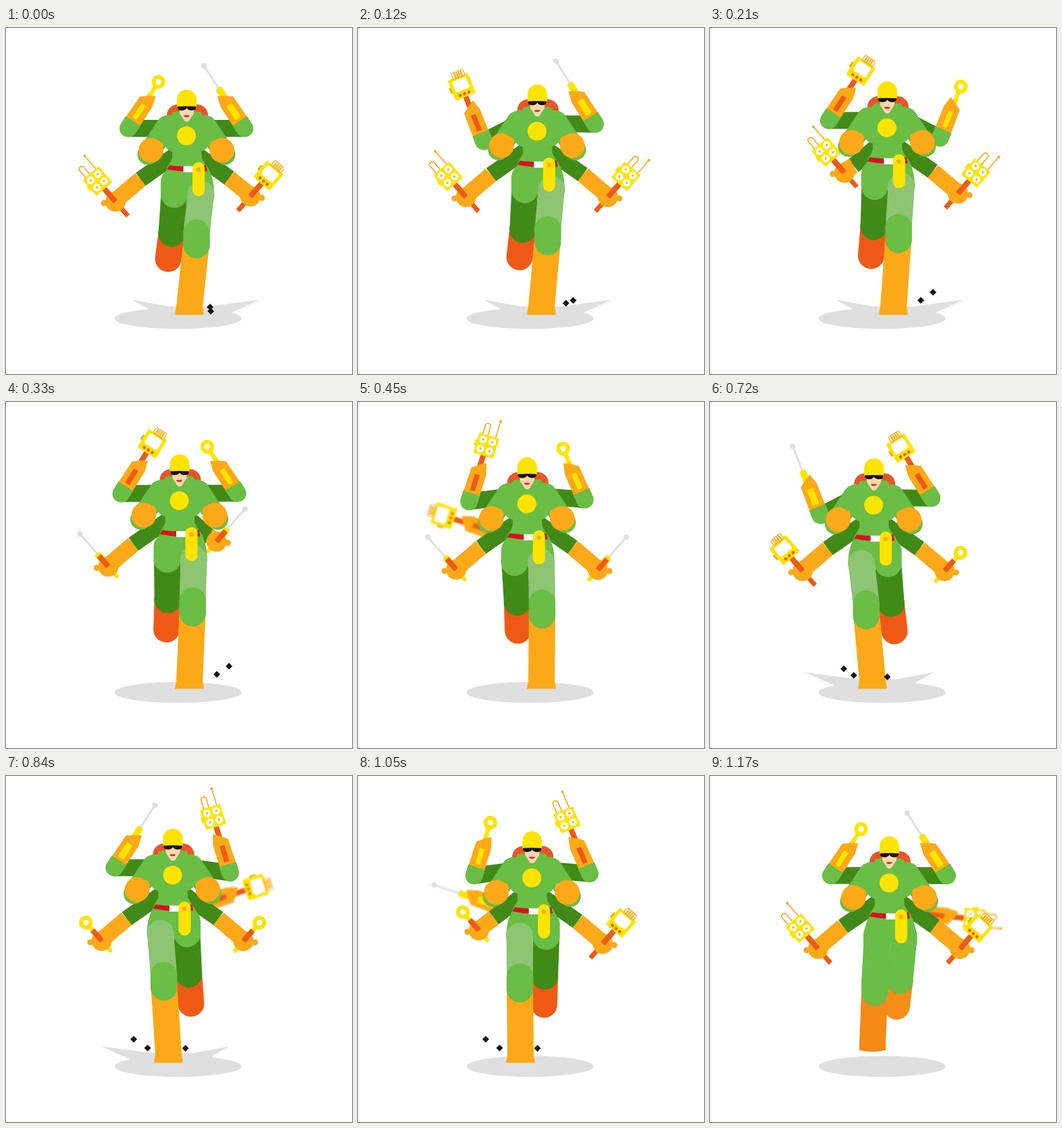
An HTML page for the animation above (1200 ms loop, 512 by 512 pixels).

```html
<!DOCTYPE html>
<html lang="en">
<head>
<meta charset="utf-8">
<title>Many-armed runner</title>
<style>
html, body { margin: 0; width: 100%; height: 100%; overflow: hidden; background: #fff; }
svg { display: block; width: 100vw; height: 100vh; }
</style>
</head>
<body>
<svg id="stage" viewBox="0 0 512 512"></svg>
<script>
const LOOP = 1200, HALF = 600, STEP = 30, SWAP = 300;
const C = {
  green: '#6abd45', dark: '#418a17', light: '#8dc572', orange: '#fba919',
  red: '#ee5a16', yellow: '#fde400', grey: '#dfdfdf', skin: '#fbd9ac'
};
const stage = document.getElementById('stage');

const mod = (a, n) => ((a % n) + n) % n;
const clamp = v => Math.max(0, Math.min(1, v));
const bell = (d, w) => Math.exp(-d * d / (w * w));
const lerp = (a, b, q) => a + (b - a) * q;
function mix(a, b, q) {
  const ch = (c, i) => parseInt(c.slice(i, i + 2), 16);
  return 'rgb(' + [1, 3, 5].map(i => Math.round(lerp(ch(a, i), ch(b, i), clamp(q)))) + ')';
}

// Shape helpers
const circle = (x, y, r, f) => `<circle cx="${x}" cy="${y}" r="${r}" fill="${f}"/>`;
const rect = (x, y, w, h, f, r = 0) =>
  `<rect x="${x}" y="${y}" width="${w}" height="${h}" rx="${r}" fill="${f}"/>`;
const path = (d, f) => `<path d="${d}" fill="${f}"/>`;
const wire = (d, w, c) => `<path d="${d}" fill="none" stroke="${c}" stroke-width="${w}"/>`;
const line = (x1, y1, x2, y2, w, c, cap = 'butt') =>
  `<line x1="${x1}" y1="${y1}" x2="${x2}" y2="${y2}" stroke="${c}" stroke-width="${w}" stroke-linecap="${cap}"/>`;
const shift = (x, y, s) => `<g transform="translate(${x} ${y})">${s}</g>`;
const place = (x, y, a, s) => `<g transform="translate(${x} ${y}) rotate(${a})">${s}</g>`;

// Tools point up from a hand at the origin.
const tools = {
  wrench: () => path('M-4-5L-3-20Q-2-25-6-30H6Q2-25 3-20L4-5Z', C.yellow) +
    `<circle cy="-36" r="7.2" fill="none" stroke="${C.yellow}" stroke-width="6"/>`,
  probe: () => line(0, -22, 0, -63, 3, C.grey) + circle(0, -64, 4, C.grey) +
    rect(-5, -26, 10, 22, C.yellow, 4),
  meter: () => {
    let s = rect(-4, -28, 8, 22, C.red) + rect(-18.5, -46, 4, 9, '#f5a800', 1) +
      rect(-16, -57, 32, 32, C.yellow, 1.5) + rect(-11, -53, 22, 17, '#fff', 2);
    for (let i = -1; i < 2; i++) s += circle(i * 7, -30, 2.3, C.red);
    for (let i = 0; i < 5; i++) {
      const x = i * 3.4 - 5;
      s += wire(`M${x - 2.5}-60a2.5 5 0 1 1 5 0a2.5 5 0 1 1-5 0`, 1.2, C.orange);
    }
    return s;
  },
  lamps: () => {
    let s = wire('M-10-55V-69Q-10-73-6-73T-2-69V-55M10-55V-80', 1.6, C.orange) +
      circle(10, -81, 2, C.orange) + rect(-4, -28, 8, 22, C.red) +
      rect(-15.5, -56, 31, 31, C.yellow, 1.5) + rect(-18, -45, 4, 9, C.yellow, 1);
    for (const x of [-7, 7]) for (const y of [-48, -34])
      s += circle(x, y, 5.6, '#fff') + circle(x, y, 1.7, '#f4b400');
    return s;
  }
};
const boxy = n => n === 'meter' || n === 'lamps';

// Forearm pointing up from an elbow at the origin.
function forearm(tool, side) {
  const w = tool === 'probe' ? 10 : 7.5, b = boxy(tool);
  return shift(0, -46, tools[tool]()) +
    `<g transform="scale(${-side} 1)">${path('M-12.5-8L-11.500-49L-1-57L8-62L10-55L12.500-46V-8Z', C.orange)}</g>` +
    rect(-w / 2, -42, w, 25, b ? C.red : C.yellow, b ? 0 : 2) +
    path('M-13-13H13V0A13 13 0 0 1-13 0Z', C.green);
}

// Each raised arm swings out at a swap; an extra arm takes the old tool down.
function upperArm(t, side, first, list) {
  const n = mod(t - first, LOOP), d = n % SWAP, i = Math.floor(n / SWAP);
  const swing = bell(d, 27) + bell(SWAP - d, 46);
  const drop = 26 * swing, sx = 267 + side * 36;
  const ex = sx + side * Math.sqrt(2500 - drop * drop), ey = 148.5 + drop;
  let s = line(sx - side * 8, 148.5, ex, ey, 25, C.dark) +
    place(ex, ey, side * (55 * swing - 33), forearm(list[i], side));
  if (d > 15 && d < 75) {
    const old = forearm(list[(i + 3) % 4], side);
    s += `<g filter="url(#soft)">${place(267 + side * 40, 204, side * (48 + 0.8 * d), old)}</g>`;
  }
  return s;
}

// Lowered arms pull up and inwards for a moment at each swap.
function lowerArm(t, side, first, gap, list) {
  const i = Math.min(3, Math.floor(mod(t - first, LOOP) / gap));
  const tool = list[i];
  let w = 0;
  for (let k = 0; k < 4; k++) w += bell(t - first - k * gap, 24);
  const at = x => 267 + side * x;
  const hx = at(105 - 50 * w), hy = 257 - 37 * w;
  const ex = at(68 - 22 * w), ey = 224 - 10 * w;
  const tail = boxy(tool) ? rect(-3.5, 0, 7, 28, C.red) : rect(-3, 0, 6, 22, C.yellow, 3);
  return line(at(15), 187, ex, ey, 24, C.dark) +
    place(hx, hy, side * 41, tools[tool]() + tail) +
    line(ex, ey, hx - side * 4, hy - 5, 24, C.orange) +
    circle(hx, hy, 15, C.orange) + circle(hx + side * 17, hy + 2, 4.5, C.orange) +
    place(hx, hy, side * 41, rect(-4, -21, 8, 21, C.red, 1));
}

function legs(u, p, right, X, dy) {
  const m = x => right ? x : 512 - x;
  const hipY = 246 + dy, lift = clamp(u * 10 - 9);
  const hip = out => X + (out === right ? 21.5 : -18);

  const thigh = (hx, kx, ky, len, far) => {
    const upper = far < .5 ? mix(C.light, C.green, far * 2) : mix(C.green, C.dark, far * 2 - 1);
    return line(hx, hipY, kx, ky, 39, upper, 'round') +
      line(kx, ky, kx, ky + len, 39.5, mix(C.green, C.dark, far * 2 - 1), 'round') +
      line(hx, hipY - 18 * far, hx, hipY, 40, mix(C.light, C.green, far * 2), 'round');
  };

  const bx = m(245 - 15 * p), by = 304 + dy * .85;
  const back = line(bx, by, m(240 - 4.5 * u), 341.500 + dy * .38, 39, mix(C.red, C.orange, lift * 1.3), 'round') +
    thigh(hip(false), bx, by, 0, 1 - lift);

  const fx = m(282 - 15 * p), fy = 303 + dy * .65;
  const ax = m(271.5), base = 424.5 - 38 * lift, flare = lift ? 0 : 2;
  const front = path(`M${fx - 19.5} ${fy + 12}H${fx + 19.5}L${ax + 19.5} ${base - 12}L${ax + 19.5 + flare} ${base}` +
      `Q${ax} ${base + 10 * lift} ${ax - 19.5 - flare} ${base}L${ax - 19.5} ${base - 12}Z`,
      mix(C.orange, C.red, lift * .8)) +
    thigh(hip(true), fx, fy, 18, lift);

  const pelvis = path('M240 205Q230 220 229 244H308Q308 222 298 205Z', C.green);
  return back + shift(X - 267, dy, pelvis) + front;
}

function ground(u, right) {
  let s = `<ellipse cx="254.5" cy="429.7" rx="94" ry="15.5" fill="${C.grey}"/>`;
  if (u < .55) {
    const spikes = path('M186 402L240 412H301L376 402L334 421L345 428H200L213 417Z', C.grey);
    s += right ? spikes : `<g transform="translate(517 -2) scale(-1 1)">${spikes}</g>`;
  }
  return s;
}

function debris(u, right) {
  if (u > (right ? .55 : .8)) return '';
  const p = clamp(u / .35);
  const bit = (x, y, dx, dy) =>
    path(`M${x + dx * p} ${y + dy * p}m0-5l5 5l-5 5l-5-5z`, '#1a1416');
  return right
    ? bit(302, 413, 10, -10) + bit(303, 419, 27, -28)
    : bit(210, 402, -21, -12.5) + bit(217, 407, -7.5, -4.5) + (u > .1 ? bit(258, 412, 7.5, -9) : '');
}

function torso() {
  let s = path('M246 182H289L290 193L298 207H238L246 193Z', C.green) +
    path('M247 124Q267 121 288 124L300 150L296 176Q288 185 278 184H256Q246 185 238 176L234 150Z', C.green);
  for (const k of [-1, 1]) {
    const x = v => 267 + k * v;
    s += circle(x(26), 143, 14.5, C.green) + circle(x(15), 163, 21, C.green) +
      line(x(29), 145, x(57), 187, 31, C.green, 'round') +
      circle(x(52.5), 181, 18.3, C.orange) +
      line(x(52), 177, x(41), 174, 14, C.orange, 'round');
  }
  return s + circle(267, 159.5, 14, C.yellow);
}

function belt() {
  return path('M242 203Q270 207 296 203L298 212Q268 215 238 209Z', '#d8121f') +
    rect(262.5, 204.5, 15, 9, '#fff') +
    rect(276, 198.5, 18, 50.5, C.yellow, 9) + circle(284.7, 209.5, 3.2, C.orange);
}

const hair = () => rect(238, 114, 61, 40, '#ea5426', 16);

function head() {
  return path('M256 114H279L278 127L271 138Q267 141 264 138L257 127Z', C.skin) +
    path('M253 118V106.500A14.500 14.500 0 0 1 282 106.500V118Q267 115 253 118Z', C.yellow) +
    path('M253.500 117Q267 116 281.500 117Q281 123 275 122.700Q269 122.500 267.500 119Q266 122.500 260 122.700Q254 123 253.500 117Z', '#17110f') +
    path('M262.500 131Q265 129 267.200 130Q269.500 129 272 131Q267 134.500 262.500 131Z', '#d9201f');
}

const defs = '<defs><filter id="soft" x="-50%" y="-50%" width="200%" height="200%">' +
  '<feGaussianBlur stdDeviation="0.9"/></filter></defs>';

function draw(t) {
  const right = t < HALF, u = (t % HALF) / HALF;
  const p = Math.pow(u, 1.57);
  const X = right ? 267 - 27 * p : 240 + 27 * p;
  const hop = Math.sin(Math.PI * u);
  const dy = -13.7 * Math.pow(hop, 1.3), headY = -.7 - 14 * Math.pow(hop, 1.1);
  const dx = X - 267;

  stage.innerHTML = defs + ground(u, right) +
    shift(dx, dy,
      upperArm(t, -1, 120, ['meter', 'lamps', 'probe', 'wrench']) +
      upperArm(t, 1, 210, ['wrench', 'meter', 'lamps', 'probe']) +
      lowerArm(t, -1, 220, 283, ['probe', 'meter', 'wrench', 'lamps']) +
      lowerArm(t, 1, 30, 300, ['lamps', 'probe', 'wrench', 'meter'])) +
    shift(dx, headY, hair()) +
    legs(u, p, right, X, dy) +
    shift(dx, dy, torso() + belt()) +
    shift(dx, headY, head()) +
    debris(u, right);
}

const start = performance.now();
function tick() {
  const t = (performance.now() - start) % LOOP;
  draw(Math.floor(t / STEP) * STEP);
  requestAnimationFrame(tick);
}
tick();
</script>
</body>
</html>
```
